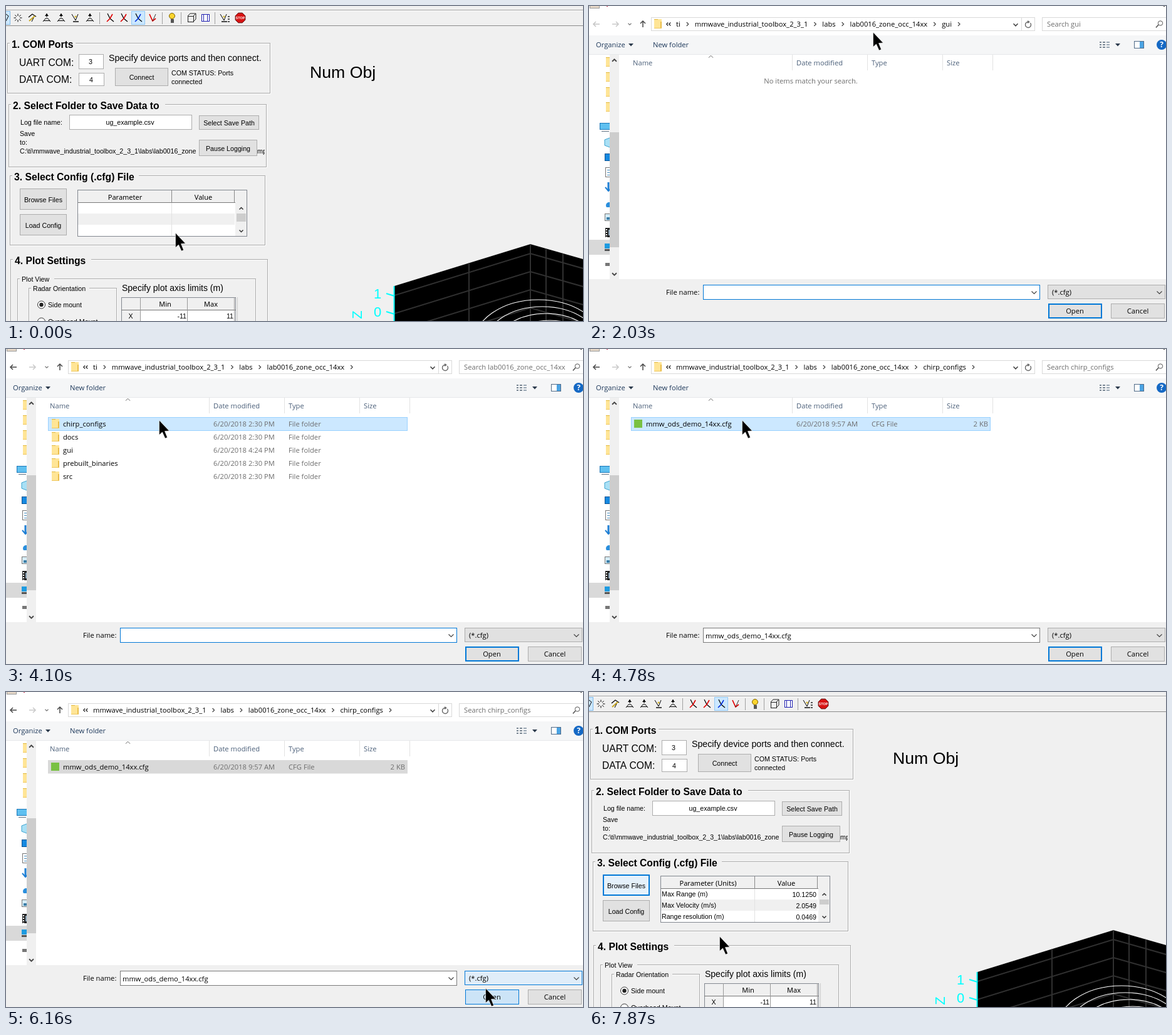
Recreate the animation shown at these times as an HTML page with a canvas. Size 921x504 px, loop 8000 ms.

```html
<!DOCTYPE html>
<html lang="en">
<head>
<meta charset="utf-8">
<title>Choosing a config file</title>
<style>
html, body { margin: 0; width: 100%; height: 100%; overflow: hidden; background: #f0f0f0; }
canvas { display: block; }
</style>
</head>
<body>
<canvas id="stage" width="921" height="504"></canvas>
<script>
const c = document.getElementById('stage').getContext('2d');
const LOOP = 8000;
const ARIAL = '"Liberation Sans", Arial, sans-serif';
const SEGOE = '"Open Sans", "Noto Sans", sans-serif';
const TABLE = '"Noto Sans", "Open Sans", sans-serif';
const BLUE = '#0078d7', GREY = '#adadad';

// time, x, y of the pointer tip
const POINTER = [
  [0, 270, 363], [330, 90, 294], [1350, 185, 308], [1700, 330, 200],
  [2030, 453, 42], [2380, 453, 27], [3060, 330, 74], [3400, 262, 114],
  [3750, 244, 114], [5130, 342, 170], [5480, 790, 459], [5810, 776, 468],
  [6160, 765, 474], [6490, 767, 475], [7190, 597, 448], [7520, 458, 424],
  [7870, 208, 391]
];

function rect(x, y, w, h, fill) {
  c.fillStyle = fill;
  c.fillRect(x, y, w, h);
}

function box(x, y, w, h, fill, border, lw = 1) {
  rect(x, y, w, h, border);
  rect(x + lw, y + lw, w - 2 * lw, h - 2 * lw, fill);
}

function path(pts, stroke, lw = 1, fill) {
  c.beginPath();
  for (let i = 0; i < pts.length; i += 2) c.lineTo(pts[i], pts[i + 1]);
  if (fill) { c.closePath(); c.fillStyle = fill; c.fill(); }
  if (stroke) { c.strokeStyle = stroke; c.lineWidth = lw; c.stroke(); }
}

function disc(x, y, r, fill, stroke) {
  c.beginPath();
  c.arc(x, y, r, 0, 7);
  if (fill) { c.fillStyle = fill; c.fill(); }
  if (stroke) { c.strokeStyle = stroke; c.lineWidth = 1; c.stroke(); }
}

// y is the middle of the capitals
function text(s, x, y, size, font, color = '#000', align = 'left', weight = '') {
  c.font = `${weight} ${size}px ${font}`;
  c.fillStyle = color;
  c.textAlign = align;
  c.fillText(s, x, Math.round(y + size * 0.36));
  return c.measureText(s).width;
}

const label = (s, x, y, align, size = 10.67) => text(s, x, y, size, ARIAL, '#000', align);
const ui = (s, x, y, color, align) => text(s, x, y, 11.2, SEGOE, color, align);
const head = (s, x, y) => text(s, x, y, 11, TABLE, '#000', 'center');

// chevron pointing by (dx, dy)
function chevron(x, y, dx, dy, color = '#444', r = 3, lw = 1.2) {
  path([x - dx * r / 2 - dy * r, y - dy * r / 2 - dx * r, x + dx * r / 2, y + dy * r / 2,
        x - dx * r / 2 + dy * r, y - dy * r / 2 + dx * r], color, lw);
}

function caretDown(x, y) {
  path([x - 4, y - 2, x + 4, y - 2, x, y + 2.5], null, 1, '#2b3a4c');
}

function button(s, x, y, w, h, state = '') {
  const fill = { hover: '#e5f1fb', press: '#cce4f7', focus: '#e5f1fb' }[state] || '#e1e1e1';
  box(x, y, w, h, fill, state ? BLUE : GREY, state === 'focus' ? 2 : 1);
  label(s, x + w / 2, y + h / 2 + 1, 'center');
}

function panel(title, x, y, w, h, gap, bold) {
  c.lineWidth = 1;
  c.strokeStyle = '#fff';
  c.strokeRect(x + 1.5, y + 1.5, w, h);
  c.strokeStyle = '#aaa';
  c.strokeRect(x + 0.5, y + 0.5, w, h);
  rect(x + 4, y - 1, gap, 4, '#f0f0f0');
  if (bold) text(title, x + 7, y + 2, 15.7, ARIAL, '#000', 'left', 'bold');
  else label(title, x + 7, y + 1);
}

function gizmo(x, kind, color = '#000') {
  if (kind === 0) {
    for (let a = 0; a < 8; a++) {
      const u = Math.cos(a * Math.PI / 4), v = Math.sin(a * Math.PI / 4);
      path([x + u * 3, 19 + v * 3, x + u * 6.5, 19 + v * 6.5], '#000');
    }
  } else if (kind === 1) {
    path([x - 6, 18, x, 13, x + 6, 17], '#000', 1.3);
    path([x - 5, 24, x + 4, 16], '#c9a820', 2);
    path([x - 1, 25, x + 2, 19], '#000');
  } else if (kind === 2) {
    path([x, 12, x, 18], '#000');
    path([x - 3, 16, x + 3, 16, x, 12], null, 1, '#000');
    path([x - 6, 25, x - 2, 20, x + 2, 20, x + 6, 25], '#000');
    rect(x - 5, 23, 10, 1, '#000');
  } else if (kind === 3) {
    path([x - 6, 13, x, 23, x + 4, 13], '#000');
    rect(x - 4, 24, 9, 2, '#444');
    disc(x, 17, 1.5, '#d4b429');
  } else {
    path([x - 4, 12, x, 20, x + 6, 25], '#000', 1.2);
    path([x - 5, 25, x, 20, x + 4, 13], color, 1.6);
  }
}

function toolbar() {
  rect(0, 6, 921, 1, '#a0a0a0');
  rect(0, 7, 921, 1, '#fff');
  rect(0, 31, 921, 1, '#8a8a8a');
  box(-10, 8, 17, 22, '#cce8ff', '#7db8e8');
  path([0, 13, 4, 16, 0, 24], '#000');
  [0, 1, 2, 2, 3, 2].forEach((k, i) => gizmo(19 + i * 23, k));
  box(200, 8, 22, 22, '#cce8ff', '#90c8f6');
  gizmo(166, 4, '#e00000');
  gizmo(188, 4, '#e00000');
  gizmo(211, 4, '#0030e0');
  path([229, 13, 234, 24, 239, 20], '#e00000', 1.7);
  path([234, 24, 239, 13], '#333');
  for (const x of [149, 249, 279, 333]) rect(x, 10, 1, 19, '#a0a0a0');
  disc(265, 16, 4.5, '#ffd52e', '#7a6000');
  rect(263, 21, 5, 6, '#555');
  c.strokeStyle = '#222';
  c.strokeRect(290.5, 16.5, 9, 9);
  path([290, 16, 294, 12, 303, 12, 303, 21, 299, 25], '#222');
  path([299, 16, 303, 12], '#222');
  box(312, 13, 13, 12, '#fff', '#2020b0');
  path([315.5, 13, 315.5, 25], '#2020b0');
  path([321.5, 13, 321.5, 25], '#2020b0');
  gizmo(348, 3);
  for (let i = 0; i < 3; i++) rect(354, 16 + i * 4, 3, 2, '#555');
  const oct = [];
  for (let i = 0; i < 8; i++) {
    const a = (i + 0.5) * Math.PI / 4;
    oct.push(374 + 8.5 * Math.cos(a), 19 + 8.5 * Math.sin(a));
  }
  path(oct, '#500', 1, '#d81414');
  text('STOP', 374, 19, 5.5, ARIAL, '#fff', 'center', 'bold');
}

function plot() {
  text('Num Obj', 485, 105, 26.7, ARIAL);
  c.save();
  path([620, 448, 837, 381, 921, 405, 921, 504, 620, 504], null, 1, '#000');
  c.clip();
  for (let i = 0; i < 5; i++) {
    const y = 396 + i * 29;
    path([620, y + 67, 837, y, 925, y + 25], '#303030', 2);
  }
  for (const x of [739, 837, 862, 889]) path([x, 380, x, 504], '#303030', 2);
  for (let i = 0; i < 5; i++) {
    c.beginPath();
    c.ellipse(850 + i * 6, 541 + i * 3, 104 - i * 11, 71 - i * 8, 0, Math.PI, 2 * Math.PI);
    c.strokeStyle = '#fff';
    c.lineWidth = 1.1;
    c.stroke();
  }
  c.restore();
  path([619.5, 448, 619.5, 504], '#00ffff', 2);
  path([607, 460, 620, 464], '#00ffff', 2);
  path([607, 489, 620, 493], '#00ffff', 2);
  text('1', 593, 460, 22, ARIAL, '#00ffff', 'center');
  text('0', 593, 489, 22, ARIAL, '#00ffff', 'center');
  c.save();
  c.translate(560, 494);
  c.rotate(-Math.PI / 2);
  text('Z', 0, 0, 22, ARIAL, '#00ffff', 'center');
  c.restore();
}

function configTable(loaded) {
  box(114, 294, 271, 75, '#fff', '#82878f');
  rect(115, 295, 269, 20, '#f0f0f0');
  rect(115, 332, 250, 18, '#f0f0f0');
  rect(115, 314, 251, 1, '#777');
  rect(264, 295, 1, 20, '#888');
  rect(264, 315, 1, 53, '#e2e2e2');
  rect(364, 295, 1, 20, '#888');
  rect(366, 295, 18, 73, '#f0f0f0');
  rect(368, loaded ? 332 : 332, 15, loaded ? 8 : 13, '#cdcdcd');
  chevron(375.5, 324, 0, -1, '#333', 3, 1.5);
  chevron(375.5, 360, 0, 1, '#333', 3, 1.5);
  head(loaded ? 'Parameter (Units)' : 'Parameter', 190, 306);
  head('Value', 315, 306);
  if (!loaded) return;
  [['Max Range (m)', '10.1250'], ['Max Velocity (m/s)', '2.0549'],
   ['Range resolution (m)', '0.0469']].forEach(([name, value], i) => {
    label(name, 116, 323 + i * 18);
    label(value, 363, 324 + i * 18, 'right');
  });
}

function mainWindow(t) {
  rect(0, 0, 921, 504, '#f0f0f0');
  toolbar();
  plot();

  panel('1. COM Ports', 2, 59, 419, 80, 105, true);
  label('UART COM:', 21, 90, 'left', 15.6);
  label('DATA COM:', 21, 117, 'left', 15.6);
  box(116, 77, 40, 24, '#fff', GREY);
  box(116, 107, 41, 21, '#fff', GREY);
  label('3', 135, 89, 'center');
  label('4', 136, 118, 'center');
  label('Specify device ports and then connect.', 164, 83, 'left', 14.2);
  button('Connect', 174, 99, 85, 29);
  label('COM STATUS: Ports', 264, 107);
  label('connected', 264, 121);

  panel('2. Select Folder to Save Data to', 4, 157, 411, 100, 246, true);
  label('Log file name:', 23, 186);
  box(101, 174, 196, 24, '#fff', GREY);
  label('ug_example.csv', 198, 186, 'center');
  label('Save', 22, 204);
  label('to:', 22, 218);
  label('C:\\ti\\mmwave_industrial_toolbox_2_3_1\\labs\\lab0016_zone', 22, 232);
  c.save();
  c.beginPath();
  c.rect(400, 222, 13, 20);
  c.clip();
  label('mple', 401, 232);
  c.restore();
  button('Select Save Path', 308, 175, 96, 23);
  button('Pause Logging', 308, 214, 93, 26);

  panel('3. Select Config (.cfg) File', 6, 271, 407, 111, 202, true);
  let state = '';
  if (t >= 6840) state = 'focus';
  else if (t >= 6490 || t >= 670) state = 'press';
  else if (t >= 330) state = 'hover';
  button('Browse Files', 22, 292, 75, 34, state);
  button('Load Config', 22, 333, 75, 34);
  configTable(t >= 7190);

  panel('4. Plot Settings', 7, 405, 410, 140, 125, true);
  panel('Plot View', 18, 436, 380, 120, 55);
  panel('Radar Orientation', 36, 451, 140, 110, 93);
  label('Specify plot axis limits (m)', 185, 451, 'left', 14);
  disc(56.5, 478, 6, '#fff', '#333');
  disc(56.5, 478, 3.2, '#222');
  label('Side mount', 67, 478);
  disc(56.5, 505, 6, '#fff', '#333');
  label('Overhead Mount', 67, 505);
  box(184, 466, 183, 50, '#f0f0f0', '#82878f');
  rect(214, 487, 152, 20, '#fff');
  rect(184, 486, 183, 1, '#777');
  for (const x of [214, 289, 364]) rect(x, 466, 1, 40, '#999');
  rect(369, 466, 1, 40, '#ccc');
  head('Min', 254, 477);
  head('Max', 327, 477);
  label('X', 199, 496, 'center');
  label('-11', 288, 496, 'right');
  label('11', 363, 496, 'right');
}

function folder(x, y) {
  rect(x, y, 12, 15, '#ffe596');
  rect(x, y, 6, 1, '#e2b93f');
  rect(x + 10, y + 4, 2, 11, '#e9bd4b');
  rect(x, y + 14, 12, 1, '#efc75e');
}

function navPane() {
  c.save();
  c.beginPath();
  c.rect(0, 78, 33, 358);
  c.clip();
  rect(0, 374, 33, 24, '#d9d9d9');
  for (let i = 0; i < 4; i++) folder(27, 82 + i * 24.3 | 0);
  box(17, 187, 17, 11, '#5fc0f0', '#1976b8');
  rect(20, 200, 12, 1, '#607080');
  path([25, 214, 33, 211, 40, 214, 40, 224, 33, 226, 25, 223], '#3fa3cf', 1, '#a9e0f5');
  box(25, 236, 14, 12, '#1689e0', '#0b5394');
  box(26, 258, 12, 16, '#fff', '#777');
  for (let i = 0; i < 3; i++) rect(29, 262 + i * 4, 6, 1, '#4a90c0');
  path([31, 282, 31, 296], '#1f7fd4', 3);
  path([26, 290, 31, 296, 36, 290], '#1f7fd4', 2);
  disc(32, 319, 5, '#2a8fdd');
  rect(25, 322, 10, 6, '#fff');
  box(25, 332, 14, 12, '#d5ecf7', '#777');
  rect(28, 338, 8, 4, '#3c7fa8');
  rect(26, 355, 12, 15, '#222');
  for (let i = 0; i < 4; i++) rect(27, 357 + i * 4, 2, 2, '#fff');
  rect(31, 358, 5, 9, '#8aa4b8');
  rect(25, 380, 8, 8, '#1e9be0');
  rect(25, 389, 8, 3, '#555');
  rect(26, 411, 8, 5, '#777');
  c.restore();
  rect(33, 78, 15, 359, '#f0f0f0');
  rect(33, 202, 15, 184, '#cdcdcd');
  chevron(40.5, 87, 0, -1, '#444', 3.5, 1.8);
  chevron(40.5, 429, 0, 1, '#444', 3.5, 1.8);
}

function arrow(x, y, dx, dy, color) {
  path([x - 5 * dx, y - 5 * dy, x + 5 * dx, y + 5 * dy], color, 1.5);
  path([x + dx - 4 * dy, y + dy - 4 * dx, x + 5 * dx, y + 5 * dy, x + dx + 4 * dy, y + dy + 4 * dx], color, 1.5);
}

function addressBar(t) {
  const inGui = t < 3060, inConfigs = t >= 4430;
  arrow(12, 29, -1, 0, inGui ? '#c4c4c4' : '#444');
  arrow(42, 29, 1, 0, '#c8c8c8');
  chevron(65, 29, 0, 1, '#777', 2.5);
  arrow(86, 29, 0, -1, '#444');
  box(99, 18, 613, 22, '#fff', '#d9d9d9');
  rect(690, 18, 1, 22, '#d9d9d9');
  folder(104, 21);

  const crumbs = ['mmwave_industrial_toolbox_2_3_1', 'labs', 'lab0016_zone_occ_14xx'];
  if (inConfigs) crumbs.push('chirp_configs');
  else crumbs.unshift('ti');
  if (inGui) crumbs.push('gui');

  if (t >= 2380 && t < 3060) {
    const press = t >= 2710;
    box(413, 19, 144, 20, press ? '#cce8ff' : '#e5f3ff', press ? '#99d1ff' : '#cce8ff');
    rect(542, 19, 1, 20, press ? '#99d1ff' : '#cce8ff');
  } else if (t >= 3060 && t < 3400) {
    rect(413, 19, 130, 20, '#f2f5f8');
  }
  chevron(125, 29, -1, 0, '#222', 2.5);
  chevron(129, 29, -1, 0, '#222', 2.5);
  let x = 139;
  crumbs.forEach((s, i) => {
    x += ui(s, x, 29) + 11;
    const last = i === crumbs.length - 1;
    const faint = last && t >= 3060 && t < 3400;
    if (!(last && t < 1700)) chevron(x + 0.5, 29, 1, 0, faint ? '#aaa' : '#444');
    x += 12;
  });
  chevron(681, 30, 0, 1, '#444', 3.5, 1.6);
  c.beginPath();
  c.arc(701, 30, 4.5, -0.7, 4.6);
  c.strokeStyle = '#666';
  c.lineWidth = 1.4;
  c.stroke();
  path([700, 23, 704, 25.5, 700, 28], null, 1, '#666');

  box(723, 18, 210, 22, '#fff', '#d9d9d9');
  const place = inGui ? 'gui' : inConfigs ? 'chirp_configs' : 'lab0016_zone_occ_14xx';
  ui('Search ' + place, 731, 29, '#6d6d6d');
  disc(912, 27.5, 3.7, null, '#555');
  path([909, 30, 905, 34.5], '#555', 1.6);
}

function commandBar() {
  rect(0, 47, 921, 30, '#f5f6f7');
  rect(0, 77, 921, 1, '#e6e8ea');
  ui('Organize', 11, 62, '#1e395b');
  caretDown(67, 62);
  ui('New folder', 102, 62, '#1e395b');
  for (let i = 0; i < 3; i++) {
    rect(815, 57 + i * 4, 3, 2, '#7a8794');
    rect(820, 57 + i * 4, 4, 2, '#7a8794');
    rect(826, 57 + i * 4, 5, 2, '#9aa7b4');
  }
  caretDown(844, 62);
  box(870, 56, 16, 12, '#fff', '#506b88');
  rect(879, 57, 6, 10, '#4ba3e3');
  disc(914, 62, 8, '#1468c4');
  text('?', 914, 62, 12, SEGOE, '#fff', 'center', 'bold');
}

function rowBack(i, kind) {
  const y = 109 + i * 21;
  if (kind === 'picked') box(67, y, 574, 22, '#cce8ff', '#99d1ff');
  else rect(67, y, 574, 21.5, kind === 'hover' ? '#e5f3ff' : '#d9d9d9');
}

function row(i, name, date, type) {
  const y = 120 + i * 21;
  ui(name, 91, y);
  ui(date, 331, y, '#6d6d6d');
  ui(type, 451, y, '#6d6d6d');
}

function fileList(t) {
  const NAVY = '#4c607a';
  [['Name', 70], ['Date modified', 331], ['Type', 451], ['Size', 571]].forEach(([s, x]) => ui(s, x, 91, NAVY));
  for (const x of [324, 444, 564, 644]) rect(x, 78, 1, 25, '#e2e2e2');
  chevron(194.5, 81, 0, -1, '#666', 3.5, 1);

  if (t < 3060) {
    if (t >= 1700) ui('No items match your search.', 354, 120, '#6d6d6d', 'center');
    return;
  }
  if (t < 4430) {
    if (t < 4100) rowBack(2, 'idle');
    if (t >= 3750) rowBack(0, t < 4100 ? 'hover' : 'picked');
    ['chirp_configs', 'docs', 'gui', 'prebuilt_binaries', 'src'].forEach((s, i) => {
      folder(73, 112 + i * 21);
      row(i, s, `6/20/2018 ${i === 2 ? '4:24' : '2:30'} PM`, 'File folder');
    });
    return;
  }
  rowBack(0, t < 4780 ? 'hover' : t < 6160 ? 'picked' : 'idle');
  rect(72, 113, 13, 13, '#79c143');
  row(0, 'mmw_ods_demo_14xx.cfg', '6/20/2018 9:57 AM', 'CFG File');
  ui('2 KB', 637, 120, '#6d6d6d', 'right');
}

function footer(t) {
  ui('File name:', 123, 458);
  box(182, 446, 538, 24, '#fff', t < 4430 ? BLUE : '#7a7a7a');
  chevron(710.5, 458.5, 0, 1, '#444', 4);
  const caret = t < 2030 || (t >= 2380 && t < 3060) || (t >= 3400 && t < 4100);
  if (caret) rect(186, 450, 1, 16, '#000');
  if (t >= 4780) ui('mmw_ods_demo_14xx.cfg', 186, 459);

  const over = t >= 5480;
  box(732, 446, 188, 23, over ? '#e0edf9' : '#e1e1e1', over ? BLUE : GREY);
  ui('(*.cfg)', 739, 458);
  chevron(910.5, 458.5, 0, 1, '#444', 4);

  const press = t >= 6160;
  box(733, 476, 86, 24, press ? '#cce4f7' : '#e1e1e1', BLUE, press ? 1 : 2);
  ui('Open', 775.5, 488, '#000', 'center');
  box(833, 476, 86, 24, '#e1e1e1', GREY);
  ui('Cancel', 876, 488, '#000', 'center');
}

function dialog(t) {
  rect(0, 0, 921, 437, '#fff');
  rect(0, 437, 921, 67, '#f0f0f0');
  box(1, -10, 16, 14, '#e6d8c8', '#999');
  rect(28, 0, 2, 1, '#c03050');
  rect(917, 0, 2, 1, '#333');
  if (t < 1350) {
    rect(123, 450, 54, 15, '#fff');
    rect(182, 446, 538, 24, '#fff');
    rect(732, 446, 189, 23, '#fff');
    rect(732, 475, 88, 26, '#fff');
    rect(832, 475, 89, 26, '#fff');
    return;
  }
  addressBar(t);
  commandBar();
  navPane();
  fileList(t);
  footer(t);
}

function pointer(t) {
  const [, x, y] = POINTER.filter(p => p[0] <= t).pop();
  c.save();
  c.translate(x, y);
  path([0.5, 0, 0.5, 23.5, 5.5, 19, 10, 29, 13.5, 27.5, 9.5, 17.5, 16.5, 17], null, 1, '#000');
  c.strokeStyle = '#fff';
  c.lineWidth = 0.6;
  c.stroke();
  c.restore();
}

function frame(now) {
  const t = now % LOOP;
  if (t >= 1010 && t < 6490) dialog(t);
  else mainWindow(t);
  pointer(t);
  requestAnimationFrame(frame);
}
frame(0);
</script>
</body>
</html>
```
